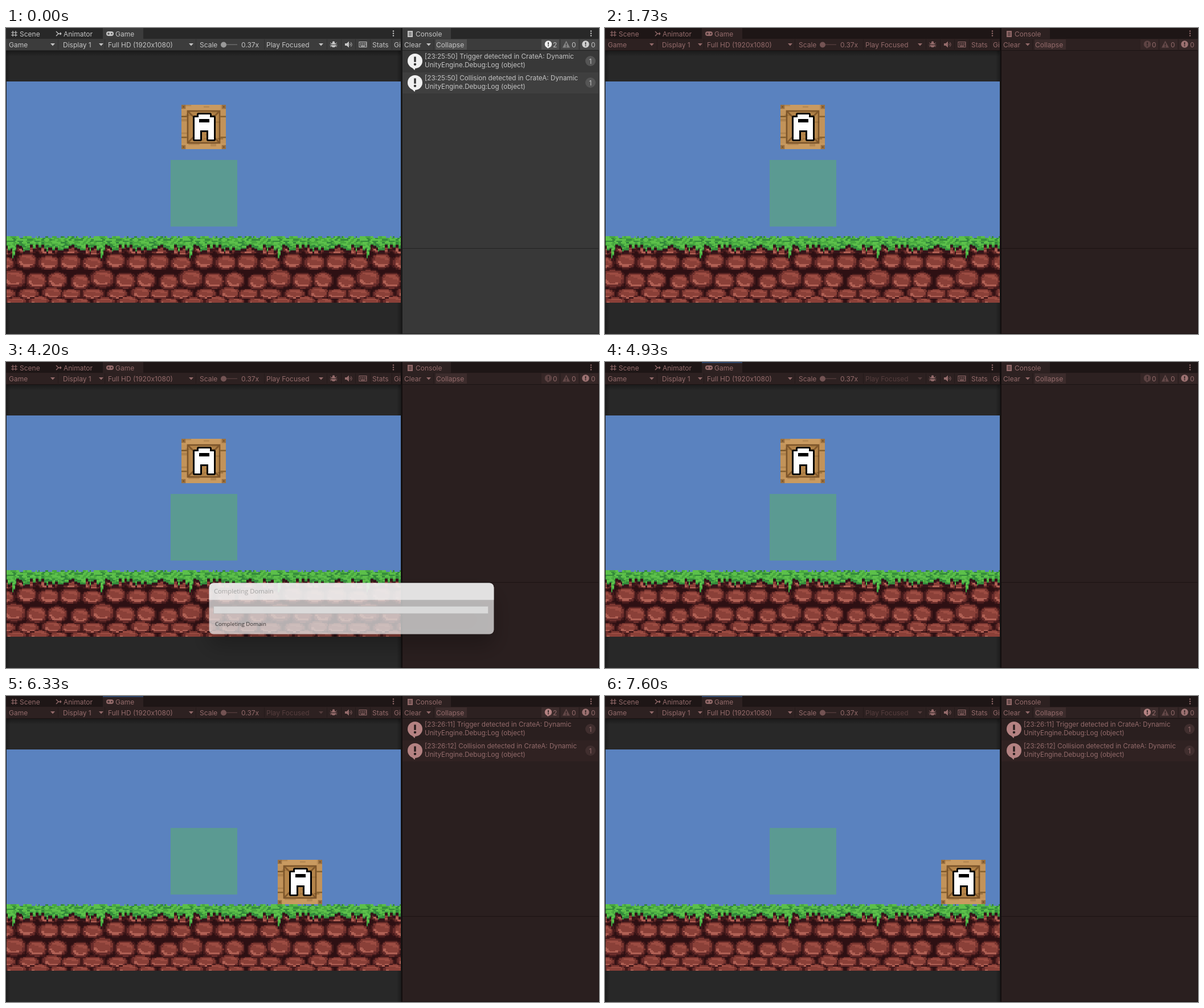
An HTML page with a canvas for the animation above (8270 ms loop, 1041 by 538 pixels).

```html
<!DOCTYPE html>
<html lang="en">
<head>
<meta charset="utf-8">
<title>Trigger and collision test</title>
<style>
  html, body { margin: 0; width: 100%; height: 100%; overflow: hidden; background: #282828; }
  canvas { display: block; }
</style>
</head>
<body>
<canvas id="stage" width="1041" height="538"></canvas>
<script>
const ctx = document.getElementById('stage').getContext('2d');
const LOOP = 8270;
const TEXEL = 2.431;
const UI = 'Inter, sans-serif';

const hash = n => { const s = Math.sin(n * 127.1 + 3.7) * 43758.5453; return s - Math.floor(s); };

function rect(x, y, w, h, color, c = ctx) {
  c.fillStyle = color;
  c.fillRect(x, y, w, h);
}

function text(str, x, y, color = '#c4c4c4', size = 12, family = UI) {
  ctx.font = `${size}px ${family}`;
  ctx.fillStyle = color;
  ctx.fillText(str, x, y);
}

function shape(points, color) {
  ctx.fillStyle = color;
  ctx.beginPath();
  points.forEach(([x, y]) => ctx.lineTo(x, y));
  ctx.fill();
}

function disc(x, y, r, color) {
  ctx.fillStyle = color;
  ctx.beginPath();
  ctx.arc(x, y, r, 0, 7);
  ctx.fill();
}

function strokes(lines, color = '#c4c4c4', width = 1.2) {
  ctx.strokeStyle = color;
  ctx.lineWidth = width;
  ctx.beginPath();
  for (const [x1, y1, x2, y2] of lines) { ctx.moveTo(x1, y1); ctx.lineTo(x2, y2); }
  ctx.stroke();
}

function makeCanvas(w, h) {
  const el = document.createElement('canvas');
  el.width = w;
  el.height = h;
  return el;
}

// One period of the rock wall: centre x, centre y, half width, half height.
const STONES = [
  [112, 388, 20, 9], [150, 391, 19, 8], [190, 387, 19, 9], [228, 388, 20, 10],
  [110, 411, 20, 14], [150, 413, 20, 12], [190, 409, 18, 14], [228, 412, 20, 13],
  [128, 446, 18, 14], [167, 440, 22, 17], [207, 444, 19, 15], [243, 443, 18, 15],
  [112, 467, 20, 9], [150, 467, 22, 10], [193, 467, 19, 10], [235, 465, 19, 11],
  [128, 481, 18, 7], [170, 480, 20, 8], [211, 479, 20, 9], [246, 481, 16, 7]
].map(([x, y, rx, ry]) => [(x - 90) / TEXEL, (y - 367) / TEXEL, rx / TEXEL, ry / TEXEL]);

function stoneColor(u, v) {
  let near = 9, next = 9, slope = 0;
  for (const [x, y, rx, ry] of STONES) {
    const dx = ((u - x + 96) % 64 - 32) / rx, dy = (v - y) / ry;
    const d = (Math.abs(dx) ** 2.4 + Math.abs(dy) ** 2.4) ** (1 / 2.4);
    if (d < near) { next = near; near = d; slope = dy - dx * 0.4; }
    else if (d < next) next = d;
  }
  if (near > 1.02) return '#2e1013';
  if (near > 0.88 || next - near < 0.14) return '#451a1b';
  if (near > 0.7) return slope > -0.2 ? '#6a2d2b' : '#7a3630';
  if (near > 0.46 && slope > 0.25) return '#b06054';
  return slope < -0.35 ? '#9c4c42' : '#8a4038';
}

function groundColor(u, v) {
  const topGap = hash(u * 3.1) < 0.4 ? 1 : 0;
  if (v < topGap) return null;
  let depth = 6 + Math.floor(hash((u >> 1) + 11) * 5);
  if (u === 31 || u === 32) depth = 16 - (u - 31) * 2;
  if (u === 23 || u === 39 || u === 56) depth = 11;
  if (v < depth) {
    const leaf = hash(((u + v) >> 1) * 7 + ((u - v + 64) >> 1) * 13);
    if (v > depth - 2 || leaf < 0.22) return '#348a3c';
    return leaf < 0.55 ? '#48a83f' : '#5cc04a';
  }
  return v < depth + 2 ? '#35151a' : stoneColor(u, v);
}

function makeGround() {
  const el = makeCanvas(286, 48), c = el.getContext('2d');
  const shift = Math.round(-89 / TEXEL) + 64;
  for (let x = 0; x < 286; x++)
    for (let y = 0; y < 48; y++) {
      const color = groundColor((x + shift) % 64, y);
      if (color) rect(x, y, 1, 1, color, c);
    }
  return el;
}

function makeCrate() {
  const el = makeCanvas(78, 78), c = el.getContext('2d');
  const box = (x, y, w, h, color) => rect(x, y, w, h, color, c);
  c.save();
  c.scale(78 / 32, 78 / 32);
  box(0, 0, 32, 32, '#a4773f');
  box(5, 5, 22, 22, '#b5854a');
  c.strokeStyle = '#83592c';
  c.lineWidth = 1.2;
  c.beginPath();
  c.moveTo(5, 5); c.lineTo(27, 27);
  c.moveTo(27, 5); c.lineTo(5, 27);
  c.stroke();
  for (const p of [0, 28]) {
    box(p, 0, 4, 32, '#c2935a');
    box(0, p, 32, 4, '#c99a60');
  }
  box(4, 4, 24, 1, '#7b542b');
  box(4, 27, 24, 1, '#7b542b');
  box(4, 5, 1, 22, '#7b542b');
  box(27, 5, 1, 22, '#7b542b');
  for (const x of [0, 28]) for (const y of [8, 23]) box(x, y, 4, 1, '#85602f');
  for (let i = 0; i < 26; i++)
    box(Math.floor(hash(i) * 27), Math.floor(hash(i + 50) * 32), 4, 1, 'rgba(96,60,20,.2)');
  for (const x of [0, 29]) for (const y of [0, 29]) {
    box(x, y, 3, 3, '#9a7040');
    box(x + 1, y + 1, 1, 1, '#73502a');
  }
  c.restore();

  const letter = [[23, 61], [23, 22], [30, 22], [30, 17], [50, 17], [50, 22],
                  [57, 22], [57, 61], [47, 61], [47, 45], [33, 45], [33, 61]];
  c.beginPath();
  letter.forEach(([x, y]) => c.lineTo(x, y));
  c.closePath();
  c.lineJoin = 'round';
  c.lineWidth = 6;
  c.strokeStyle = '#000';
  c.stroke();
  c.fillStyle = '#fff';
  c.fill();
  box(31, 25, 18, 6, '#000');
  return el;
}

const ground = makeGround();
const crate = makeCrate();

const START = 5.13, PUSH = 5.4525, LANDING = 6.03, STOP = 7.55;

// Free fall with a sideways push, then a slide slowed by friction.
function cratePosition(s) {
  const fall = Math.max(0, s - START);
  const y = Math.min(288, 135 + 190.5 * fall * fall);
  const x = s < LANDING
    ? 308 + 322 * Math.max(0, s - PUSH) ** 2
    : 590 - 76 * Math.max(0, STOP - s) ** 2;
  return [Math.round(x), Math.round(y)];
}

function drawGame(t) {
  rect(0, 40, 694, 498, '#282828');
  const fade = ctx.createLinearGradient(0, 40, 0, 50);
  fade.addColorStop(0, 'rgba(0,0,0,.35)');
  fade.addColorStop(1, 'rgba(0,0,0,0)');
  rect(0, 40, 694, 10, fade);
  for (const [from, to] of [[0, 8], [694, 686]]) {
    const side = ctx.createLinearGradient(from, 0, to, 0);
    side.addColorStop(0, 'rgba(0,0,0,.3)');
    side.addColorStop(1, 'rgba(0,0,0,0)');
    rect(Math.min(from, to), 40, 8, 498, side);
  }
  rect(1, 94, 692, 389, '#5a82bf');
  ctx.save();
  ctx.beginPath();
  ctx.rect(1, 94, 692, 389);
  ctx.clip();
  ctx.imageSmoothingEnabled = false;
  ctx.drawImage(ground, 1, 366.4, 286 * TEXEL, 48 * TEXEL);
  ctx.drawImage(crate, ...cratePosition(t / 1000));
  rect(289, 232, 117, 117, 'rgba(92,230,5,.24)');
  ctx.restore();
  rect(693, 0, 3, 538, '#191919');
  rect(0, 0, 1, 538, '#191919');
}

function arrowDown(x, color = '#c4c4c4') {
  shape([[x - 4, 27], [x + 4, 27], [x, 31.5]], color);
}

function kebab(x) {
  for (const y of [5.5, 9.5, 13.5]) disc(x, y, 1.2, '#c4c4c4');
}

function tabIcons() {
  strokes([[12, 5, 12, 15], [17, 5, 17, 15], [9, 8, 20, 8], [9, 12.5, 20, 12.5]]);
  strokes([[88, 6, 92, 10], [92, 10, 88, 14], [92, 10, 97, 10], [95, 8, 97, 10], [97, 10, 95, 12]], '#c4c4c4', 1.4);
  ctx.fillStyle = '#c4c4c4';
  ctx.beginPath();
  ctx.roundRect(176, 6, 13, 8, 4);
  ctx.fill();
  strokes([[178, 10, 182, 10], [180, 8, 180, 12]], '#3c3c3c', 1);
  disc(185.5, 10, 1.2, '#3c3c3c');
  rect(705, 5, 9, 11, '#c4c4c4');
  strokes([[707, 8, 712, 8], [707, 10.5, 712, 10.5], [707, 13, 712, 13]], '#3c3c3c', 1);
}

function toolIcons() {
  disc(575, 30, 4, '#c4c4c4');
  disc(575, 25.5, 2.2, '#c4c4c4');
  strokes([[569, 26, 581, 33], [569, 33, 581, 26], [568.5, 30, 581.5, 30]], '#c4c4c4', 1);
  rect(571, 29, 8, 1, '#3c3c3c');
  shape([[595, 27], [598, 27], [602, 23.5], [602, 34.5], [598, 31], [595, 31]], '#c4c4c4');
  ctx.strokeStyle = '#c4c4c4';
  for (const r of [2.5, 5]) {
    ctx.beginPath();
    ctx.arc(602, 29, r, -0.9, 0.9);
    ctx.stroke();
  }
  ctx.strokeRect(620, 24.5, 13, 9);
  for (const y of [26.5, 29]) for (let x = 622; x < 632; x += 3) rect(x, y, 1.8, 1.5, '#c4c4c4');
  rect(623, 31.2, 7, 1.2, '#c4c4c4');
}

function mark(x, y, r, color) {
  rect(x - r * 0.13, y - r * 0.58, r * 0.26, r * 0.72, color);
  disc(x, y + r * 0.45, r * 0.17, color);
}

function bubble(x, y, r, color) {
  disc(x, y, r, color);
  shape([[x - r * 0.6, y + r * 0.7], [x + r * 0.1, y + r * 0.8], [x - r * 0.05, y + r * 1.25]], color);
  mark(x, y, r, '#333');
}

const HOVERS = [[400, 565, 22], [460, 590, 22], [530, 615, 22], [600, 640, 36], [660, 0, 0],
                [860, 697, 37], [1260, 640, 36], [1330, 0, 0]];

function drawToolbars(t, focus, logs) {
  rect(0, 0, 1041, 19, '#282828');
  rect(170, 0, 71, 20, '#3c3c3c');
  rect(696, 0, 85, 20, '#3c3c3c');
  rect(0, 19, 1041, 20, '#3c3c3c');
  rect(0, 39, 1041, 1, '#232323');
  if (focus === 'console') rect(696, 0, 85, 2, '#3a79bb');
  if (focus === 'game') rect(170, 0, 71, 2, '#3a79bb');

  const hover = HOVERS.filter(h => t >= h[0]).pop();
  if (hover) rect(hover[1], 20, hover[2], 18, t >= 1060 && t < 1200 ? '#565656' : '#484848');
  for (const x of [91, 173, 333, 453, 563, 588, 613, 639, 677, 750]) rect(x, 20, 1, 18, '#303030');

  tabIcons();
  text('Scene', 24, 15);
  text('Animator', 101, 15);
  text('Game', 192, 15);
  text('Console', 719, 15);
  kebab(680);
  kebab(1027);

  const playColor = focus === 'game' ? '#707070' : '#c4c4c4';
  text('Game', 5, 33.5);
  text('Display 1', 100, 33.5);
  text('Full HD (1920x1080)', 179, 33.5);
  text('Scale', 340, 33.5);
  text('0.37x', 413, 33.5);
  text('Play Focused', 457, 33.5, playColor);
  text('Stats', 643, 33.5);
  text('Gi', 681, 33.5);
  [82, 167, 325, 742].forEach(x => arrowDown(x));
  arrowDown(553, playColor);
  rect(382, 28.5, 24, 1.5, '#6a6a6a');
  disc(382, 29.5, 5, '#999');
  toolIcons();

  text('Clear', 699, 33.5);
  rect(754, 20, 55, 18, '#505050');
  text('Collapse', 755, 33.5);
  for (const [x, w] of [[940, 31], [974, 31], [1008, 31]]) rect(x, 20, w, 18, '#484848');
  if (logs) rect(940, 20, 31, 18, '#505050');
  bubble(952, 28.5, 6.2, logs ? '#f0f0f0' : '#7c7c7c');
  text(String(logs), 960, 33.5);
  shape([[983.5, 22.5], [990, 34.5], [977, 34.5]], '#858585');
  mark(983.5, 30, 6, '#3c3c3c');
  text('0', 993, 33.5);
  disc(1017.5, 28.5, 6.2, '#d0d0d0');
  mark(1017.5, 28.5, 6.2, '#333');
  text('0', 1027, 33.5);
}

function drawLog(row, message) {
  const y = 40 + row * 38;
  rect(696, y, 345, 37, row % 2 ? '#3f3f3f' : '#383838');
  bubble(718, y + 18, 13, '#f0f0f0');
  text(message, 735, y + 14, '#c4c4c4', 11.7);
  text('UnityEngine.Debug:Log (object)', 735, y + 29, '#c4c4c4', 11.7);
  disc(1026, y + 18, 9, '#555');
  text('1', 1023.5, y + 22.5, '#c4c4c4', 11.7);
}

function drawConsole(logs, times) {
  rect(696, 40, 345, 498, '#383838');
  ['Trigger', 'Collision'].slice(0, logs).forEach((kind, i) =>
    drawLog(i, `[${times[i]}] ${kind} detected in CrateA: Dynamic`));
  rect(696, 387, 345, 1, '#232323');
  rect(1040, 40, 1, 498, '#232323');
  rect(696, 537, 345, 1, '#232323');
}

// Play mode tint, leaving the game picture untouched.
function tintPanels() {
  ctx.save();
  ctx.globalCompositeOperation = 'multiply';
  rect(0, 0, 1041, 40, '#bf8a8a');
  rect(694, 40, 347, 498, '#bf8a8a');
  ctx.restore();
}

function dialogAmount(t) {
  if (t < 1860 || t >= 4330) return 0;
  if (t >= 4260) return 0.32;
  if (t >= 4200) return 0.72;
  return 1 - (1 - Math.min(1, (t - 1800) / 333)) ** 2;
}

function drawDialog(t) {
  const amount = dialogAmount(t);
  if (!amount) return;
  const scale = 1 - 0.043 * (1 - amount);
  ctx.save();
  ctx.globalAlpha = amount;
  ctx.translate(606.5, 433.5);
  ctx.scale(scale, scale);
  ctx.translate(-606.5, -433.5);
  ctx.save();
  ctx.shadowColor = 'rgba(0,0,0,.35)';
  ctx.shadowBlur = 36;
  ctx.shadowOffsetY = 20;
  ctx.fillStyle = '#f0f0f0';
  ctx.beginPath();
  ctx.roundRect(353.5, 388, 506, 91, 8);
  ctx.fill();
  ctx.restore();
  ctx.fillStyle = '#f3f3f3';
  ctx.beginPath();
  ctx.roundRect(353.5, 388, 506, 30, [8, 8, 0, 0]);
  ctx.fill();
  rect(361, 429, 489, 14, '#bcbcbc');
  rect(362, 430, 487, 12, '#e6e6e6');
  const name = from => t < from ? 'Reloading Domain' : 'Completing Domain';
  text(name(2400), 362, 407, '#8a8a8a', 11.4, '"Open Sans", sans-serif');
  text(name(2460), 364, 464, '#000', 9.8, '"Open Sans", sans-serif');
  ctx.restore();
}

function logCount(t) {
  if (t < 1060) return 2;
  return (t / 1000 >= PUSH ? 1 : 0) + (t / 1000 >= LANDING ? 1 : 0);
}

function focusAt(t) {
  if (t >= 4930) return 'game';
  return t >= 200 && t < 1730 ? 'console' : '';
}

function draw(ms) {
  const t = Math.floor((ms + 4) * 0.015) / 0.015;
  const logs = logCount(t);
  const times = t < 1060 ? ['23:25:50', '23:25:50'] : ['23:26:11', '23:26:12'];
  drawConsole(logs, times);
  drawGame(t);
  drawToolbars(t, focusAt(t), logs);
  rect(693, 0, 3, 40, '#191919');
  if (t >= 1599) tintPanels();
  drawDialog(t);
}

const begin = performance.now();
function tick() {
  draw((performance.now() - begin) % LOOP);
  requestAnimationFrame(tick);
}
tick();
</script>
</body>
</html>
```
